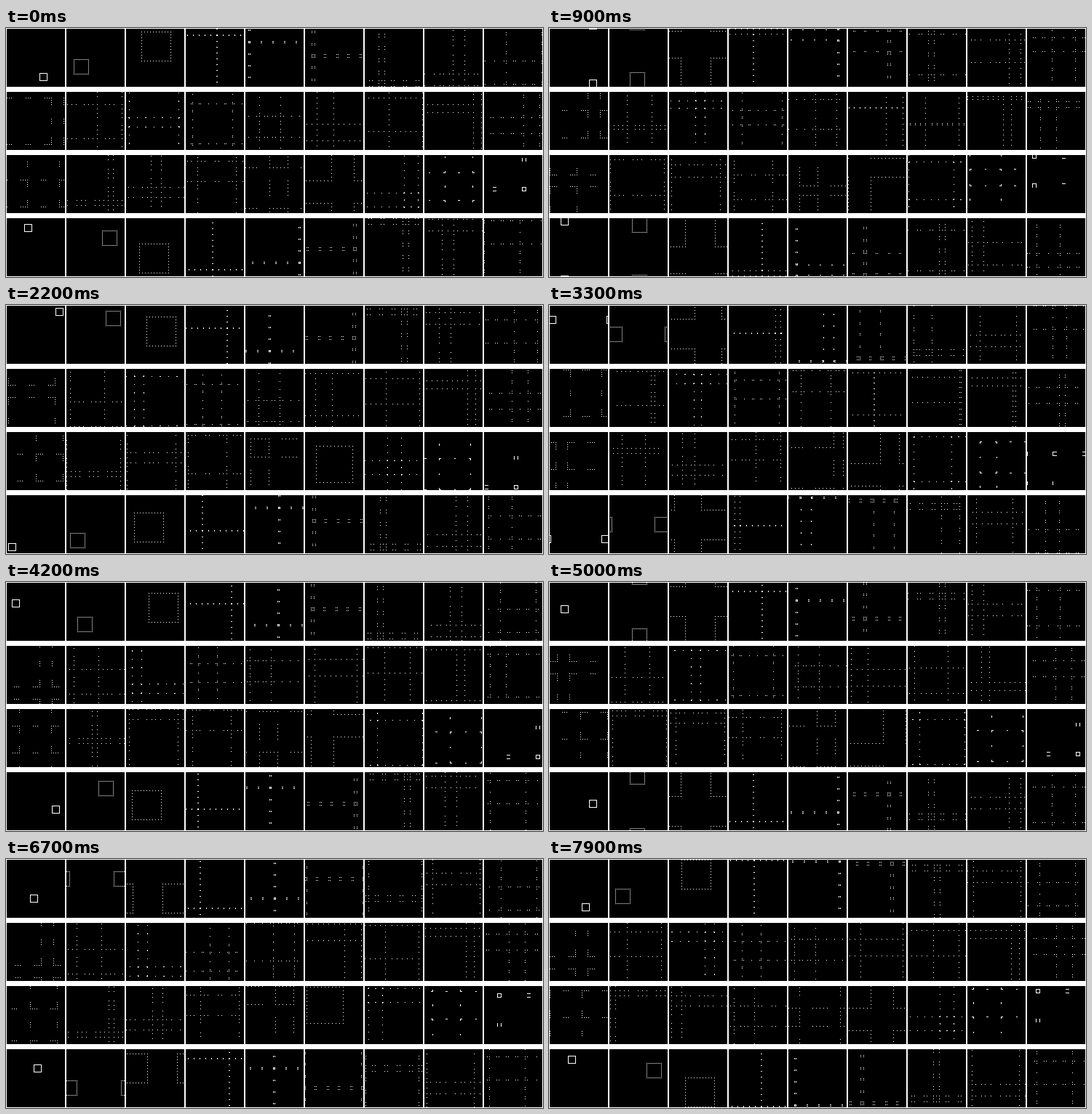
Write an HTML page with a canvas that moves like this. It is 738x343 px and loops after 8 s.

```html
<!DOCTYPE html>
<html lang="en">
<head>
<meta charset="utf-8">
<title>Doubling permutations of a drifting square</title>
<style>
  html, body { margin: 0; width: 100%; height: 100%; overflow: hidden; background: #fff; }
  canvas { display: block; }
</style>
</head>
<body>
<canvas id="stage" width="738" height="343"></canvas>
<script>
const ctx = document.getElementById('stage').getContext('2d');
const SIZE = 80, MOD = SIZE + 1, SIDE = 10;
const COLS = 9, ROWS = 4, STEP_X = 82, STEP_Y = 87;
const FRAME_MS = 100, FRAMES = 80;
const START_X = 46, START_Y = 62;

// Pixel indices run from 1 to SIZE and wrap around.
const wrap = i => (i - 1) % SIZE + 1;

function squareOutline(step) {
  const points = [];
  const add = (dx, dy) =>
    points.push([wrap(START_X + step + dx), wrap(START_Y + step + dy)]);
  for (let i = 0; i < SIDE; i++) {
    add(i, 0);
    add(SIDE, i);
    add(SIDE - i, SIDE);
    add(0, SIDE - i);
  }
  return points;
}

function draw(step) {
  ctx.fillStyle = '#fff';
  ctx.fillRect(0, 0, 738, 343);
  const points = squareOutline(step);
  // Each panel doubles the indices of the previous one, modulo 81.
  let factor = 1;
  for (let n = 0; n < COLS * ROWS; n++) {
    const left = n % COLS * STEP_X;
    const top = Math.floor(n / COLS) * STEP_Y;
    ctx.fillStyle = '#000';
    ctx.fillRect(left + 1, top + 1, SIZE, SIZE);
    ctx.fillStyle = '#fff';
    for (const [x, y] of points) {
      ctx.fillRect(left + x * factor % MOD, top + y * factor % MOD, 1, 1);
    }
    factor = factor * 2 % MOD;
  }
}

let shown = -1;
function tick() {
  const step = Math.floor(performance.now() / FRAME_MS) % FRAMES;
  if (step !== shown) draw(shown = step);
  requestAnimationFrame(tick);
}
tick();
</script>
</body>
</html>
```
